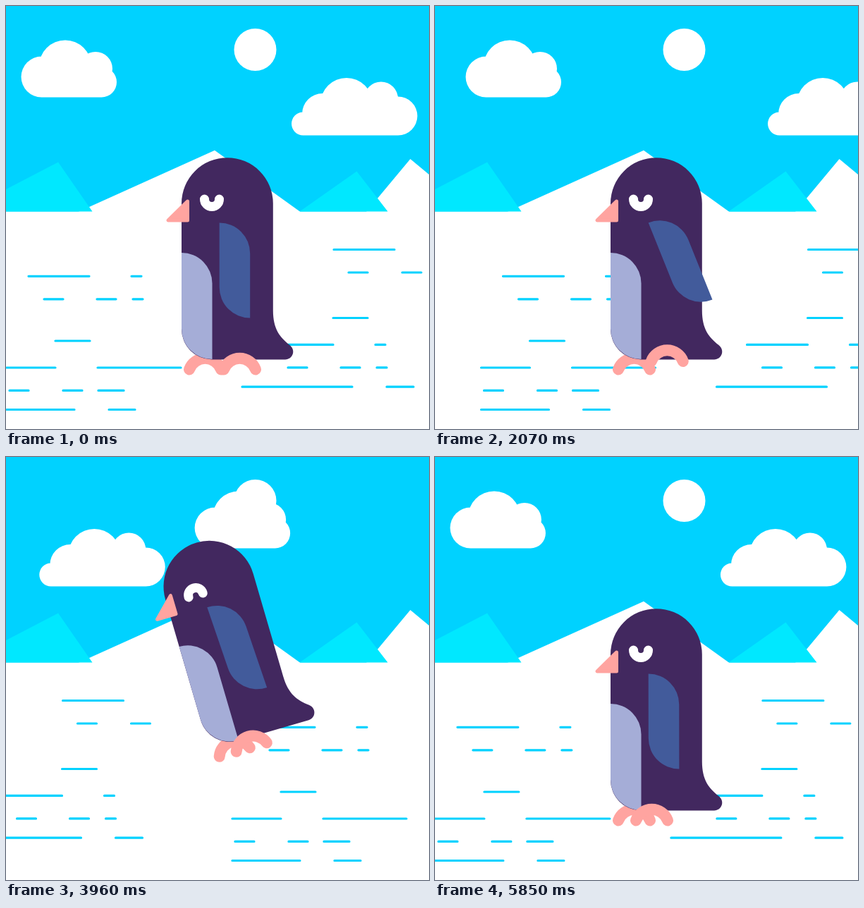
An HTML page with a canvas for the animation above (5880 ms loop, 600 px wide and 600 px high).

```html
<!DOCTYPE html>
<html>
<head>
<meta charset="utf-8">
<style>
html, body { margin: 0; width: 100%; height: 100%; overflow: hidden; background: #fff; }
canvas { display: block; width: 600px; height: 600px; }
</style>
</head>
<body>
<canvas id="stage" width="600" height="600"></canvas>
<script>
const ctx = document.getElementById('stage').getContext('2d');
const LOOP = 5880, DEG = Math.PI / 180;
const SKY = '#00d2ff', TEAL = '#00e8ff', BODY = '#42285f', WING = '#425b9b',
      BELLY = '#a5add7', PINK = '#ffa4a0';
let t = 0;

// Progress from 0 to 1 between two times, then shapes built on it.
const progress = (from, to) => Math.min(1, Math.max(0, (t - from) / (to - from)));
const ease = (from, to) => { const u = progress(from, to); return u * u * (3 - 2 * u); };
const bump = (from, to) => Math.sin(Math.PI * progress(from, to)) ** 2;
// Zero before x = 0 and x after it, with a soft bend.
const ramp = x => 130 * Math.log1p(Math.exp(x / 130));

// Leaving scenery strolls along, then glides from start to stop;
// the next copy glides in and settles at the given time.
const leave = m => m.stroll * (t / 900) ** m.power + m.speed * (ramp(t - m.start) - ramp(t - m.stop));
const arrive = m => -m.inSpeed * ramp(m.settle - t);

const dashMove = { stroll: 17, power: 1.6, speed: 0.225, start: 3349, stop: 4815, inSpeed: 0.343, settle: 5082 };
const cloud1Move = { stroll: 7, power: 1.375, speed: 0.2975, start: 3315, stop: 4980, inSpeed: 0.3, settle: 5010 };
const cloud2Move = { stroll: 22, power: 1.337, speed: 0.3, start: 3800, stop: 4900, inSpeed: 0.33, settle: 5045 };

const mountains = new Path2D('M102.5 292L296 204.7L417.5 292ZM511 292L573.5 217L600 239V292Z');
const hills = new Path2D('M0 260L74 221.5L122.5 291.5H0ZM416.5 291.5L497.5 234.5L541.5 291.5Z');
const bodyShape = new Path2D('M249 280A64.9 64.9 0 0 1 378.8 280V432C378.8 458 388.5 470 402.5 481C411.5 488 407 501.4 396 501.4H292A43 43 0 0 1 249 458Z');
const bellyShape = new Path2D('M249 350A43.5 43.5 0 0 1 292.5 393.5V501A43.5 43.5 0 0 1 249 457.5Z');
const wingShape = new Path2D('M0 0A43.5 43.5 0 0 1 43.5 43.5V135A43.5 43.5 0 0 1 0 91.5Z');
const beakShape = new Path2D('M257.5 277L230 304H257.5Z');
const footShape = new Path2D('M-22.5 515.5A24 24 0 0 1 22.5 515.5');
const dashes = makeDashes();
const cloud1 = makeCloud(129.5, [50.5, 100.5, 29], [84, 85.5, 37], [127, 89, 24], [135.5, 108, 21.5]);
const cloud2 = makeCloud(183.5, [421.5, 167, 16.5], [449, 153, 29], [483, 139, 37], [532, 131.5, 24], [556, 156, 27.5]);

function makeDashes() {
  const path = new Path2D();
  // Lengths alternate between dash and gap.
  const row = (x, y, ...lengths) => lengths.forEach((length, i) => {
    if (i % 2 === 0) {
      path.moveTo(x + 1, y);
      path.lineTo(x + length - 1, y);
    }
    x += length;
  });
  const ripple = (x, y) => {
    row(x, y, 88, 58, 16);
    row(x + 22, y + 32.5, 29, 46, 29, 22, 16);
  };
  ripple(31, 383.3);
  ripple(377, 480.4);
  row(464, 345.5, 88);
  row(485, 378, 29, 47, 29);
  row(463, 442.5, 51);
  row(69, 475, 51);
  row(0, 513, 71, 58, 120);
  row(4, 545.4, 29, 47, 29, 21, 38);
  row(0, 572.5, 98, 47, 39);
  row(334, 540.2, 158, 47, 40);
  return path;
}

// Puffs are x, y, radius; a flat base joins the first to the last.
function makeCloud(base, ...puffs) {
  const path = new Path2D();
  for (const [x, y, r] of puffs) {
    path.moveTo(x + r, y);
    path.arc(x, y, r, 0, 2 * Math.PI);
  }
  const left = puffs[0][0], [right, top] = puffs.at(-1);
  path.rect(left, top - 12, right - left, base - top + 12);
  return path;
}

function fill(shape, color) {
  ctx.fillStyle = color;
  ctx.fill(shape);
}

function stroke(shape, color, width) {
  ctx.strokeStyle = color;
  ctx.lineWidth = width;
  ctx.stroke(shape);
}

function shifted(x, y, draw) {
  ctx.save();
  ctx.translate(x, y);
  draw();
  ctx.restore();
}

function passing(move, draw) {
  shifted(leave(move), 0, draw);
  shifted(arrive(move), 0, draw);
}

function drawScenery() {
  ctx.fillStyle = '#fff';
  ctx.fillRect(0, 0, 600, 600);
  ctx.fillStyle = SKY;
  ctx.fillRect(0, 0, 600, 291.5);
  fill(new Path2D('M353.5 32a30 30 0 0 1 0 60a30 30 0 0 1 0-60Z'), '#fff');
  passing(cloud1Move, () => fill(cloud1, '#fff'));
  passing(cloud2Move, () => fill(cloud2, '#fff'));
  fill(mountains, '#fff');
  fill(hills, TEAL);
  passing(dashMove, () => stroke(dashes, SKY, 3.2));
}

function drawEye() {
  // Curve goes from 1 (asleep) to -1 (smiling) and back.
  const curve = 1 - 2 * ease(2800, 3100) + 2 * ease(5350, 5650);
  const eye = new Path2D();
  eye.ellipse(292, 280.2 - 6.2 * curve, 10.5, 10.5 * Math.abs(curve), 0, 0, Math.PI, curve < 0);
  stroke(eye, '#fff', 13);
}

function drawBird() {
  const lift = 109.5 * (ease(2670, 4250) - ease(4424, 5850));
  const tilt = 20 * (ease(2650, 3300) - ease(3300, 5700)) + 0.5 * bump(0, 1900);
  const flap = 40 * (bump(1450, 3790) + bump(3790, LOOP));
  const foot = () => stroke(footShape, PINK, 16);

  ctx.save();
  ctx.translate(313.5, 371 - lift);
  ctx.rotate(-tilt * DEG);
  ctx.translate(-313.5, -371);
  shifted(282.5 - 23 * (ease(0, 750) - ease(950, 1900)), -11 * bump(0, 750), foot);
  fill(bodyShape, BODY);
  fill(bellyShape, BELLY);
  shifted(331.5 - 24 * ease(1950, 2600), -12.5 * bump(1700, 2600), foot);
  fill(beakShape, PINK);
  stroke(beakShape, PINK, 5);
  drawEye();
  shifted(302.7, 307.5, () => {
    ctx.rotate(-flap * DEG);
    fill(wingShape, WING);
  });
  ctx.restore();
}

function frame() {
  t = performance.now() % LOOP;
  ctx.lineCap = ctx.lineJoin = 'round';
  drawScenery();
  drawBird();
  requestAnimationFrame(frame);
}
frame();
</script>
</body>
</html>
```
